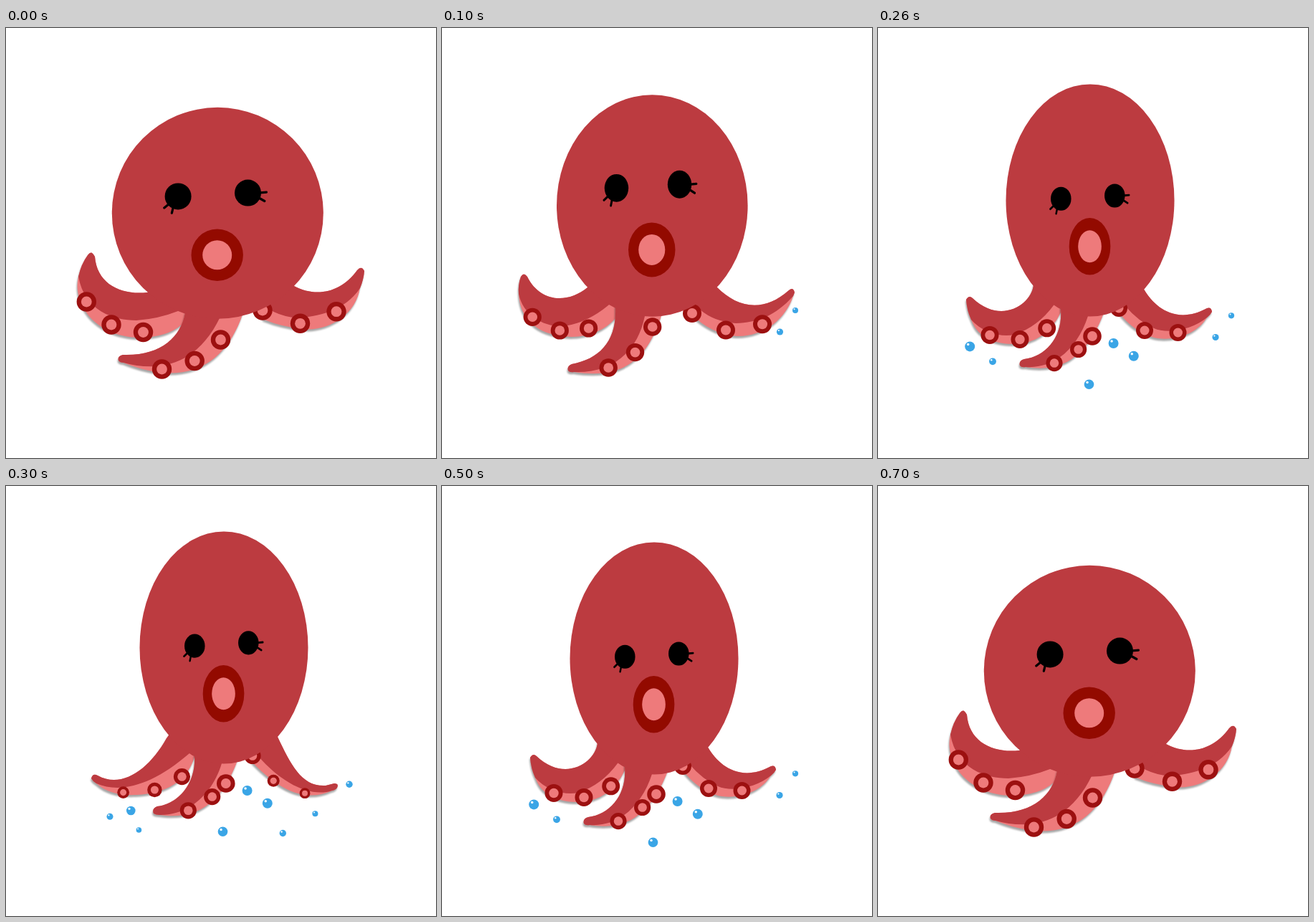
These frames come from a looping animation (600 by 600 pixels, 0.8 s). An HTML page:

```html
<!DOCTYPE html>
<html lang="en">
<head>
<meta charset="utf-8">
<title>Bouncing octopus</title>
<style>
  html, body { margin: 0; width: 100%; height: 100%; overflow: hidden; background: #fff; }
  svg { display: block; width: 100%; height: 100%; }
  .skin { fill: #bc3b40; }
  .pink { fill: #ee7a7b; }
  .ring { fill: #9c1010; }
  .lips { fill: #930a00; }
  .drop { fill: #3aa5e6; }
  .shine { fill: #fff; }
  .under { filter: drop-shadow(-1px 3px 1.2px rgba(0, 0, 0, .35)); }
  .lash { fill: none; stroke: #000; stroke-width: 3.2; stroke-linecap: round; }
</style>
</head>
<body>
<svg id="stage" viewBox="0 0 600 600" xmlns="http://www.w3.org/2000/svg"></svg>
<script>
// Each arm: top = upper edge to the tip, mid = lower edge of the skin,
// low = lower edge of the pink side, cups = [x, y, radius].
const poses = [
  {
    body: [295.3, 258.3, 147.5, 147.5],
    eyes: [288.8, 232.5, 1, 1],
    arms: [
      { top: "M250 350L197 369C160 373 127 357 124 319Q119 309 114 317Q105 329 101 347",
        mid: "C110 395 150 408 182 408Q212 406 240 395L260 380",
        low: "C92 385 125 432 189 432Q225 431 245 414L275 380",
        cups: [[112.3, 382, 13.7], [147, 414, 13.7], [191.5, 424.5, 13.7]] },
      { top: "M380 340L402 360C432 376 467 370 490 338Q496 331 500 339Q499 351 494 363",
        mid: "C472 396 430 405 400 404Q380 401 365 391L345 375",
        low: "C488 400 450 424 414 420Q385 417 360 407L340 385",
        cups: [[358, 394, 13.7], [410.5, 412.3, 13.7], [461, 395.7, 13.7]] },
      { top: "M262 370L250 397C244 432 215 458 163 456Q155 458 157 464Q159 467 164 467",
        mid: "C215 481 267 470 299 403L305 380",
        low: "C230 494 300 490 331 397L325 370",
        cups: [[217.5, 476, 13.7], [263.2, 464.5, 13.7], [299.5, 435, 13.7]] }
    ],
    drops: []
  },
  {
    body: [293.3, 248, 133.3, 154.8],
    eyes: [287.5, 220.8, 0.904, 1.05],
    arms: [
      { top: "M230 340L203 362C175 385 137 383 119 347Q114 340 110 347Q106 358 107 371",
        mid: "C113 401 142 418 171 416Q203 411 232 387L250 370",
        low: "C109 412 140 430 181 431Q220 430 242 405L260 375",
        cups: [[126.2, 403.3, 12.6], [164.3, 422, 12.6], [204.6, 419, 12.6]] },
      { top: "M365 340L384 362C412 390 448 398 484 366Q490 361 492 369Q491 372 490 374",
        mid: "C465 402 440 411 410 412Q380 410 360 393L340 370",
        low: "C480 405 450 431 411 430Q382 428 356 407L338 385",
        cups: [[349, 398, 13], [396, 421.5, 13], [447, 413.3, 13]] },
      { top: "M243 370L242 390C244 437 220 462 181 469Q174 472 176 478Q178 481 184 480",
        mid: "C235 482 272 455 283 402L285 380",
        low: "C250 490 285 466 306 402L305 380",
        cups: [[232.2, 474, 12.7], [269.5, 452.6, 12.7], [293.7, 417, 12.7]] }
    ],
    drops: [[493, 394, 4], [471.5, 424, 4.6]]
  },
  {
    body: [296, 240.5, 117.5, 162],
    eyes: [292.8, 236.1, 0.77, 0.895],
    arms: [
      { top: "M240 340L217 358C215 385 172 415 132 377Q127 372 123 379Q124 394 130 407",
        mid: "C145 424 170 432 190 428Q223 417 245 387L255 370",
        low: "C140 434 165 441 190 441Q235 440 256 395L260 370",
        cups: [[156, 428.4, 12.5], [198, 434.4, 12.5], [235.7, 418.8, 12.5]] },
      { top: "M355 345L372 366C385 388 415 415 459 391Q465 389 466 396Q464 400 459 404",
        mid: "C440 420 405 428 385 419Q363 409 346 389L335 370",
        low: "C445 428 410 438 385 432Q357 424 336 397L325 380",
        cups: [[336, 391, 12], [372, 422, 12], [418.5, 425, 12]] },
      { top: "M255 370L255 393C258 430 235 458 204 462Q196 464 198 471Q200 474 206 473",
        mid: "C245 476 278 448 293 402L295 380",
        low: "C255 481 290 462 315 398L312 380",
        cups: [[246, 467.6, 11.6], [279.6, 448.5, 11.6], [299, 430, 12.8]] }
    ],
    drops: [[128.2, 444.4, 7], [160, 465.3, 4.9], [328.6, 440, 7], [356.8, 457.8, 7],
            [294.5, 497.3, 6.8], [471, 431.5, 4.6], [493, 401.3, 4.1]]
  },
  {
    body: [304, 225.5, 117.5, 162],
    eyes: [300.8, 221, 0.77, 0.895],
    arms: [
      { top: "M240 330L224 352C200 395 162 423 128 404Q121 400 119 408Q121 412 126 415",
        mid: "C160 430 205 417 256 373L262 360",
        low: "C140 428 160 432 182 431Q250 427 264 375L270 355",
        cups: [[163.6, 427.6, 8.4], [207.4, 424, 10.2], [245.5, 405.6, 11.6]] },
      { top: "M365 330L379 350C398 390 413 420 446 418L458 415Q465 415 462 421Q460 424 455 425",
        mid: "C425 435 385 415 352 377L345 360",
        low: "C420 441 385 428 344 386L335 365",
        cups: [[344, 376.5, 11.6], [373.2, 411.3, 8.5], [417, 428.7, 7.4]] },
      { top: "M263 355L263 378C265 412 243 443 211 447Q203 450 206 457Q209 459 214 459",
        mid: "C255 460 288 430 301 387L303 365",
        low: "C265 466 300 445 323 383L320 365",
        cups: [[254.3, 452.8, 11.6], [287.7, 433.6, 11.6], [306.8, 415, 12.8]] }
    ],
    drops: [[145, 461.3, 4.5], [174.3, 453, 6.3], [185.4, 480, 3.8], [336.6, 425, 7],
            [364.8, 442.7, 7], [302.5, 482.3, 6.8], [386.3, 484.5, 4.7],
            [431.4, 457.3, 4], [479, 416.3, 4.7]]
  }
];

const STEP = 100;
const circle = (x, y, r, cls) => `<circle cx="${x}" cy="${y}" r="${r}" class="${cls}"/>`;
const path = (d, cls) => `<path d="${d}" class="${cls}"/>`;
const place = ([x, y, sx, sy], inner) =>
  `<g transform="translate(${x} ${y}) scale(${sx} ${sy})">${inner}</g>`;

const cup = ([x, y, r]) => circle(x, y, r, "ring") + circle(x, y, r * 0.54, "pink");
const drop = ([x, y, r]) =>
  circle(x, y, r, "drop") + circle(x - r * 0.36, y - r * 0.42, r * 0.25, "shine");
const arm = ({ top, mid, low, cups }) =>
  path(top + low + "Z", "pink under") + path(top + mid + "Z", "skin") + cups.map(cup).join("");

const eyes =
  circle(-48.7, 2.4, 18.5, "eye") + circle(48.7, -2.4, 18.5, "eye") +
  path("M-62 13.5L-68 18.5M-55.5 17.5L-57.4 25.7M66-2.6L74.6-3.3M64 4.5L72 9", "lash");

function head([x, y, rx, ry]) {
  const face = circle(0, 0, 147.5, "skin") +
    circle(-0.6, 58.5, 36.2, "lips") + circle(-0.6, 58.5, 20.5, "pink");
  return place([x, y, rx / 147.5, ry / 147.5], face);
}

const stage = document.getElementById("stage");
stage.innerHTML = poses.map(p =>
  `<g>${p.arms.map(arm).join("")}${head(p.body)}${place(p.eyes, eyes)}${p.drops.map(drop).join("")}</g>`
).join("");
const layers = [...stage.children];

// Poses run up and back down: 0 1 2 3 3 2 1 0.
const start = performance.now();
function draw(now) {
  const span = poses.length * 2;
  const i = Math.floor(Math.max(0, now - start) / STEP) % span;
  const current = Math.min(i, span - 1 - i);
  layers.forEach((g, k) => { g.style.display = k === current ? "" : "none"; });
  requestAnimationFrame(draw);
}
draw(start);
</script>
</body>
</html>
```
